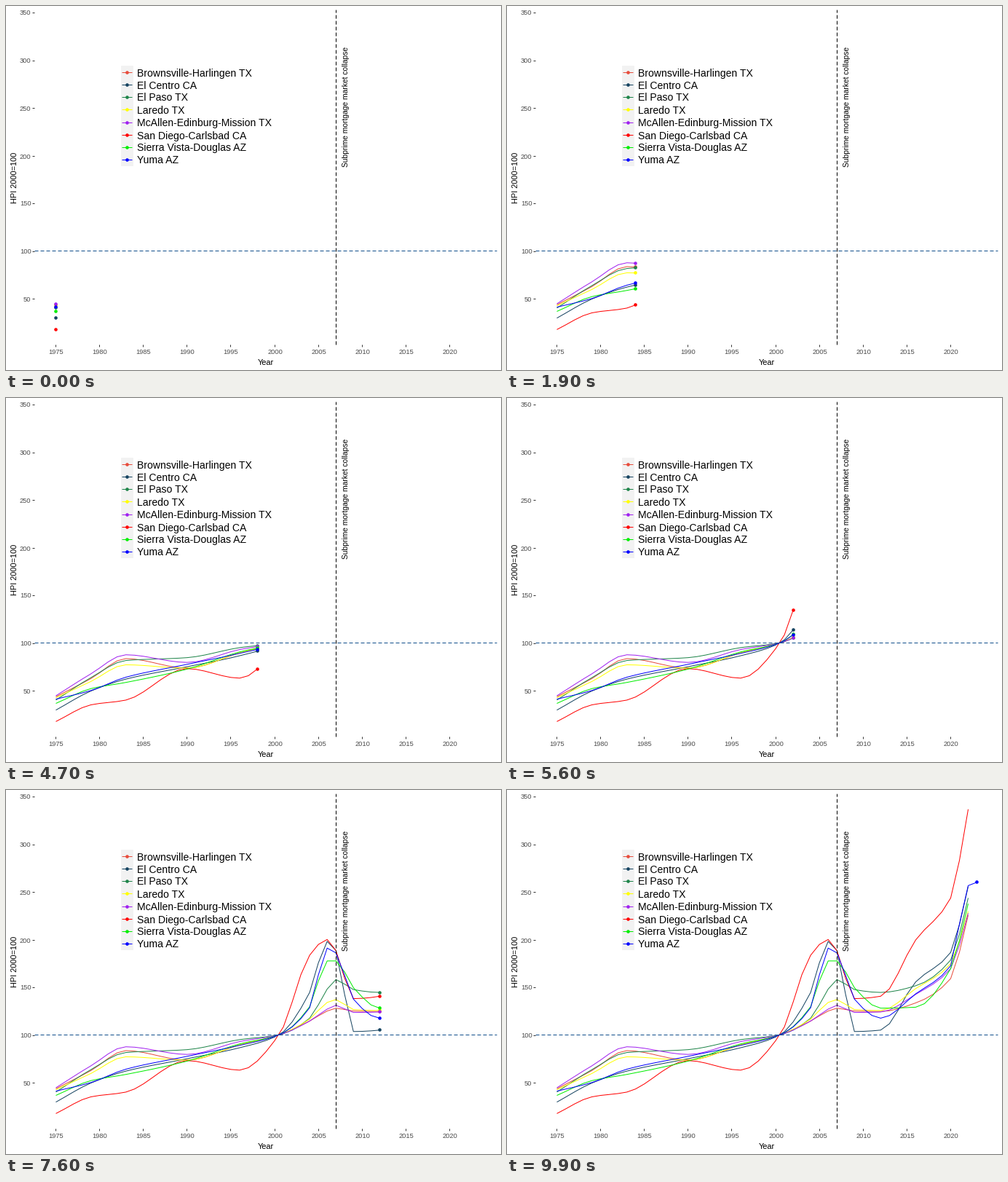
A matplotlib script that plays this animation: 680 px wide and 500 px high, repeating every 10000 ms.

```python
import matplotlib.pyplot as plt
from matplotlib.animation import FuncAnimation
from matplotlib.patches import Rectangle
import numpy as np

W, H = 680, 500
FRAMES, INTERVAL = 100, 100
FIRST, LAST = 1975, 2023
BASE_YEAR, BASE = 2000.5, 100.5  # every index passes through its base here
TURNS = np.array([1975, 1979, 1983, 1990, 1996, BASE_YEAR, 2004, 2006, 2007,
                  2009, 2012, 2016, 2020, 2022, 2023])
PX = 0.72  # points per pixel at 100 dpi

# Turning points of each index, without the shared base.
CITIES = [
    ("Brownsville-Harlingen TX", "#E74C3C",
     [44, 63, 84, 74, 90, 115, 125.5, 128.5, 125.5, 125, 134, 159.5, 226]),
    ("El Centro CA", "#154360",
     [30, 50, 62.5, 75.5, 87, 145, 198.5, 189, 104, 105.5, 156, 187, 256]),
    ("El Paso TX", "#1E8449",
     [40.5, 64, 82, 85, 95.5, 118, 148.5, 158.5, 148, 145, 152, 179, 244]),
    ("Laredo TX", "yellow",
     [43, 60, 77.5, 74, 90, 117, 134.5, 137.5, 127, 126, 149, 175, 230]),
    ("McAllen-Edinburg-Mission TX", "#A020F0",
     [45, 68, 88, 80, 93.5, 115, 127.5, 131.5, 124, 124.5, 143, 170, 228]),
    ("San Diego-Carlsbad CA", "red",
     [18, 35.5, 40.5, 73.5, 63.5, 184, 200.5, 189, 138.5, 141, 200, 244, 337]),
    ("Sierra Vista-Douglas AZ", "#00EE00",
     [37, 52.5, 59, 73, 91, 130, 178, 178, 150, 128.5, 129.5, 170, 238]),
    ("Yuma AZ", "blue",
     [41.5, 50.5, 64.5, 78, 89.5, 129, 191.5, 186.5, 138, 118, 143.5, 173,
      257, 260.5]),
]
NAMES, COLORS, POINTS = zip(*CITIES)

plt.rcParams["font.family"] = "Liberation Sans"
fig = plt.figure(figsize=(W / 100, H / 100), dpi=100, facecolor="white")
ax = fig.add_axes([0, 0, 1, 1])
ax.set_xlim(0, W)
ax.set_ylim(H, 0)
ax.axis("off")


def px_x(year):
    return 68.5 + 12.022 * (year - FIRST)


def px_y(value):
    return 468 - 1.31 * value


def smooth(xs, ys, x):
    """Monotone cubic through the points: no overshoot at the turns."""
    h = np.diff(xs)
    d = np.diff(ys) / h
    prod, total = d[:-1] * d[1:], d[:-1] + d[1:]
    inner = np.divide(2 * prod, total, out=np.zeros_like(prod), where=prod > 0)
    m = np.concatenate([d[:1], inner, d[-1:]])
    i = np.clip(np.searchsorted(xs, x, side="right") - 1, 0, len(h) - 1)
    t = (x - xs[i]) / h[i]
    return (ys[i] * (1 + 2 * t) * (1 - t) ** 2 + ys[i + 1] * t * t * (3 - 2 * t)
            + h[i] * (m[i] * t * (1 - t) ** 2 - m[i + 1] * t * t * (1 - t)))


def yearly(points):
    values = np.insert(np.array(points, float), list(TURNS).index(BASE_YEAR), BASE)
    turns = TURNS[:len(values)]
    years = np.arange(FIRST, turns[-1] + 1)
    return years, smooth(turns, values, years)


def line(xs, ys, color, **kw):
    return ax.plot(xs, ys, color=color, lw=PX, solid_capstyle="butt",
                   dash_capstyle="butt", **kw)[0]


def dots(x, y):
    return ax.scatter(x, y, s=(4.6 * PX) ** 2, c=COLORS, linewidths=0, zorder=6)


def label(x, y, text, size, color="black", **kw):
    ax.text(x, y, text, fontsize=size * PX, color=color, va="baseline", **kw)


def draw_axes():
    for v in range(50, 351, 50):
        y = int(px_y(v))
        line([36, 39], [y, y], "#333333")
        label(34.5, y + 3.5, v, 9.3, "#4D4D4D", ha="right")
    for year in range(1975, 2021, 5):
        x = int(px_x(year))
        line([x, x], [465, 468], "#333333")
        label(x + 0.5, 478.5, year, 9.3, "#4D4D4D", ha="center")
    label(356.5, 493, "Year", 11, ha="center")
    turned = dict(rotation=90, rotation_mode="anchor", ha="center")
    label(15.5, 235.5, "HPI 2000=100", 11, **turned)
    label(470.5, 138.5, "Subprime mortgage market collapse", 10.3, **turned)
    dashes = (0, (5, 3))
    line([39, 674], [336, 336], "#104E8B", ls=dashes, zorder=5)
    line([453, 453], [465, 5], "black", ls=dashes, zorder=5)


def draw_legend():
    ax.add_patch(Rectangle((158, 82), 17, 138, fc="#F2F2F2", lw=0, zorder=1))
    rows = (91 + 17.28 * np.arange(len(CITIES))).astype(int)
    for name, color, y in zip(NAMES, COLORS, rows):
        line([159, 173], [y, y], color, zorder=3)
        label(180, y + 5.5, name, 14)
    dots(np.full(len(rows), 166.5), rows + 0.5)


draw_axes()
draw_legend()
series = [yearly(p) for p in POINTS]
paths = [line([], [], color, zorder=3) for color in COLORS]
heads = dots(np.zeros(len(CITIES)), np.zeros(len(CITIES)))

# Every year lands on a whole frame; motion between them is linear.
YEARS = np.arange(FIRST, LAST + 1)
STOPS = np.rint((YEARS - FIRST) * (FRAMES - 1) / (LAST - FIRST))


def update(i):
    now = np.interp(i, STOPS, YEARS)
    tips = []
    for (years, values), path in zip(series, paths):
        end = min(now, years[-1])
        seen = years < end
        tip = np.interp(end, years, values)
        path.set_data(px_x(np.append(years[seen], end)),
                      px_y(np.append(values[seen], tip)))
        done = now > years[-1]
        tips.append((np.nan, np.nan) if done else (px_x(end), px_y(tip)))
    heads.set_offsets(np.floor(tips) + 0.5)
    return [*paths, heads]


anim = FuncAnimation(fig, update, frames=FRAMES, interval=INTERVAL,
                     init_func=lambda: update(0), repeat=True, repeat_delay=0)
plt.show()
```
